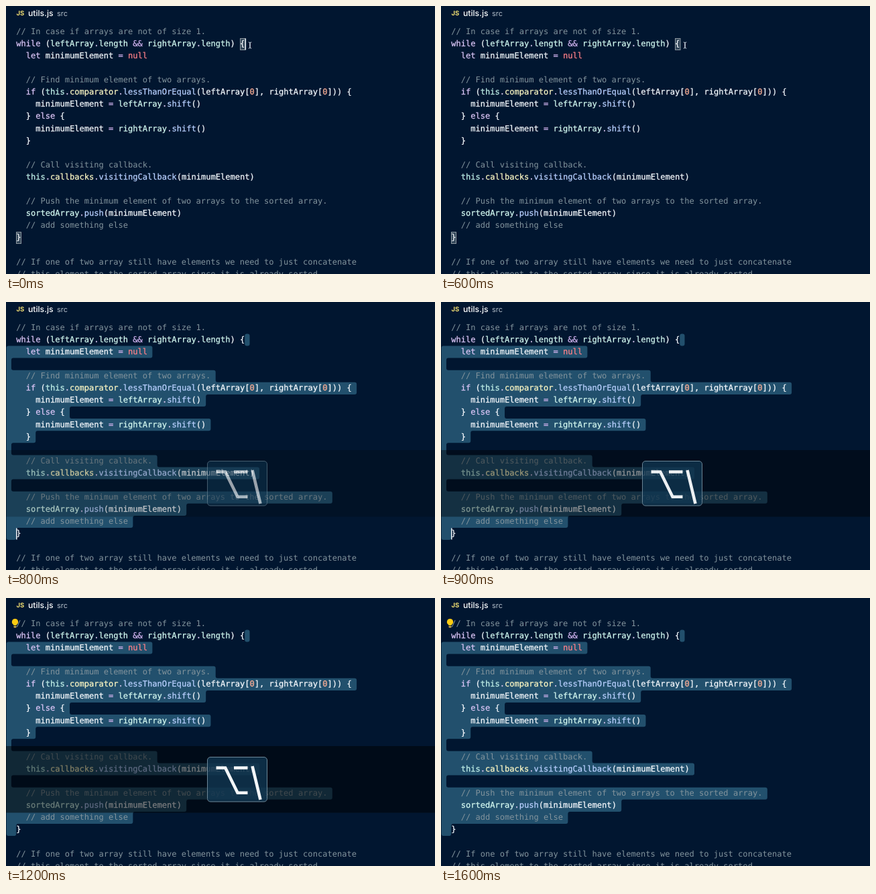
An HTML page that plays this animation: 640x400 px, repeating every 1.7 s.

```html
<!DOCTYPE html>
<html lang="en">
<head>
<meta charset="utf-8">
<title>Code selection</title>
<style>
  html, body { margin: 0; width: 100%; height: 100%; overflow: hidden; background: #011630; }
  svg { display: block; width: 640px; height: 400px; }
  text { text-rendering: geometricPrecision; white-space: pre; }
  .code { font: 12.05px "DejaVu Sans Mono", monospace; stroke-width: .25; }
  .ui { font-family: Inter, sans-serif; }
</style>
</head>
<body>
<svg viewBox="0 0 640 400" xmlns="http://www.w3.org/2000/svg">
  <rect width="640" height="400" fill="#011630"/>
  <g class="ui">
    <text x="15.5" y="14.2" font-size="9.5" font-weight="700" fill="#f0dc72">JS</text>
    <text x="33" y="15.4" font-size="12.2" font-weight="500" fill="#fff">utils.js</text>
    <text x="76" y="15.4" font-size="11" fill="#b3bec9">src</text>
  </g>
  <g id="selection" fill="#22506d"></g>
  <g id="brackets" fill="#33475a" stroke="#8d979f" stroke-width="1">
    <rect x="349.5" y="48.5" width="7.5" height="17"/>
    <rect x="15.5" y="337.5" width="7" height="17"/>
  </g>
  <g id="code" class="code"></g>
  <rect id="caret" width="1.6" height="17" fill="#e4eaf0"/>
  <path id="mouse" d="M361.8 54q2.2 0 2.2 1.6v6q0 1.6-2.2 1.6M366.2 54q-2.2 0-2.2 1.6v6q0 1.6 2.2 1.6" fill="none" stroke="#d5dde6" stroke-width="1"/>
  <g id="bulb">
    <path d="M13.5 31a4.7 4.7 0 0 1 2.7 8.5q-.7.6-.7 1.5h-4q0-.9-.7-1.5A4.7 4.7 0 0 1 13.5 31z" fill="#ffcc12"/>
    <path d="M11.5 42h4v1.3q0 1-1 1h-2q-1 0-1-1z" fill="#d9b44a"/>
  </g>
  <rect id="band" y="221" width="640" height="99.5" fill="#000"/>
  <g id="key">
    <rect x="300.5" y="237.5" width="89" height="66.5" rx="4.5" fill="#123853" fill-opacity=".76" stroke="#6d8797" stroke-width="1"/>
    <path d="M313.5 253.5H327.2L345.5 290.8H360.5M340 253.5H360.5M367.5 251L379.5 301" fill="none" stroke="#f4f7f9" stroke-width="4.6"/>
  </g>
</svg>
<script>
const LOOP = 1700, STEP = 100;
const LEFT = 0.7, CHAR = 7.256, TOP = 29.3, ROW = 18.1, BASE = 12.4;

const lines = `  // In case if arrays are not of size 1.
  while (leftArray.length && rightArray.length) {
    let minimumElement = null

    // Find minimum element of two arrays.
    if (this.comparator.lessThanOrEqual(leftArray[0], rightArray[0])) {
      minimumElement = leftArray.shift()
    } else {
      minimumElement = rightArray.shift()
    }

    // Call visiting callback.
    this.callbacks.visitingCallback(minimumElement)

    // Push the minimum element of two arrays to the sorted array.
    sortedArray.push(minimumElement)
    // add something else
  }

  // If one of two array still have elements we need to just concatenate
  // this element to the sorted array since it is already sorted.`.split("\n");

const rules = [
  [/^\/\/.*/, "#82939c"],
  [/^(while|let|if|else)\b/, "#dcc6f7"],
  [/^(&&|=)/, "#d2b4f0"],
  [/^this\b/, "#c3f2ea"],
  [/^null\b/, "#ff8088"],
  [/^\d/, "#ffb096"],
  [/^(comparator|callbacks)\b/, "#fdf8c4"],
  [/^(length\b|\w+Array(?=\.))/, "#d3f8f0"],
  [/^\w+(?=\()/, "#b9d0ff"],
  [/^\./, "#d6c4ee"],
  [/^(\w+|[^\s\w])/, "#f6f9fd"]
];

const $ = id => document.getElementById(id);
const colX = col => LEFT + col * CHAR;
const rowY = row => TOP + row * ROW;

function add(parent, tag, attrs, content) {
  const el = document.createElementNS("http://www.w3.org/2000/svg", tag);
  for (const name in attrs) el.setAttribute(name, attrs[name]);
  if (content) el.textContent = content;
  parent.appendChild(el);
}

function drawLine(line, row) {
  let col = 0;
  while (col < line.length) {
    const rest = line.slice(col);
    const rule = rules.find(([pattern]) => pattern.test(rest));
    if (!rule) { col++; continue; }
    const [pattern, color] = rule;
    const token = rest.match(pattern)[0];
    const stroke = token.startsWith("//") ? "none" : color;
    add($("code"), "text", { x: colX(col), y: rowY(row) + BASE, fill: color, stroke }, token);
    col += token.length;
  }
}

// One outline around the selected rows, with rounded steps on the right.
function selectionPath(first, last) {
  const r = 3;
  const edge = row => row === last ? colX(2) : colX(lines[row].length + 1);
  let d = `M${LEFT + r} ${rowY(first)}H${edge(first) - r}q${r} 0 ${r} ${r}`;
  for (let row = first; row < last; row++) {
    const gap = edge(row + 1) - edge(row);
    d += `V${rowY(row + 1) - (gap ? r : 0)}`;
    if (!gap) continue;
    const s = Math.sign(gap) * r;
    d += `q0 ${r} ${s} ${r}H${edge(row + 1) - s}q${s} 0 ${s} ${r}`;
  }
  const end = rowY(last + 1);
  return d + `V${end - r}q0 ${r} ${-r} ${r}H${LEFT + r}q${-r} 0 ${-r} ${-r}V${rowY(first) + r}q0 ${-r} ${r} ${-r}z`;
}

lines.forEach(drawLine);
add($("selection"), "path", { d: selectionPath(2, 17) });
add($("selection"), "rect", { x: colX(49), y: rowY(1), width: CHAR, height: ROW, rx: 3 });

const ramp = (t, from, to) => Math.min(1, Math.max(0, (t - from) / (to - from)));
const show = (id, on) => $(id).setAttribute("opacity", +on);

function render(time) {
  const t = Math.floor((time % LOOP) / STEP) * STEP;
  const selected = t >= 700;
  show("selection", selected);
  show("mouse", !selected);
  show("brackets", t < 800);
  show("bulb", t >= 1100);

  show("caret", t < 200 || (selected && t < 1200));
  $("caret").setAttribute("x", selected ? 15 : 356.5);
  $("caret").setAttribute("y", selected ? 337.5 : 48.5);

  show("key", Math.min(ramp(t, 610, 910), 1 - ramp(t, 1250, 1480)));
  show("band", 0.5 * Math.min(ramp(t, 700, 950), 1 - ramp(t, 1250, 1600)));
}

const start = performance.now();
function frame() {
  render(performance.now() - start);
  requestAnimationFrame(frame);
}
render(0);
requestAnimationFrame(frame);
</script>
</body>
</html>
```
